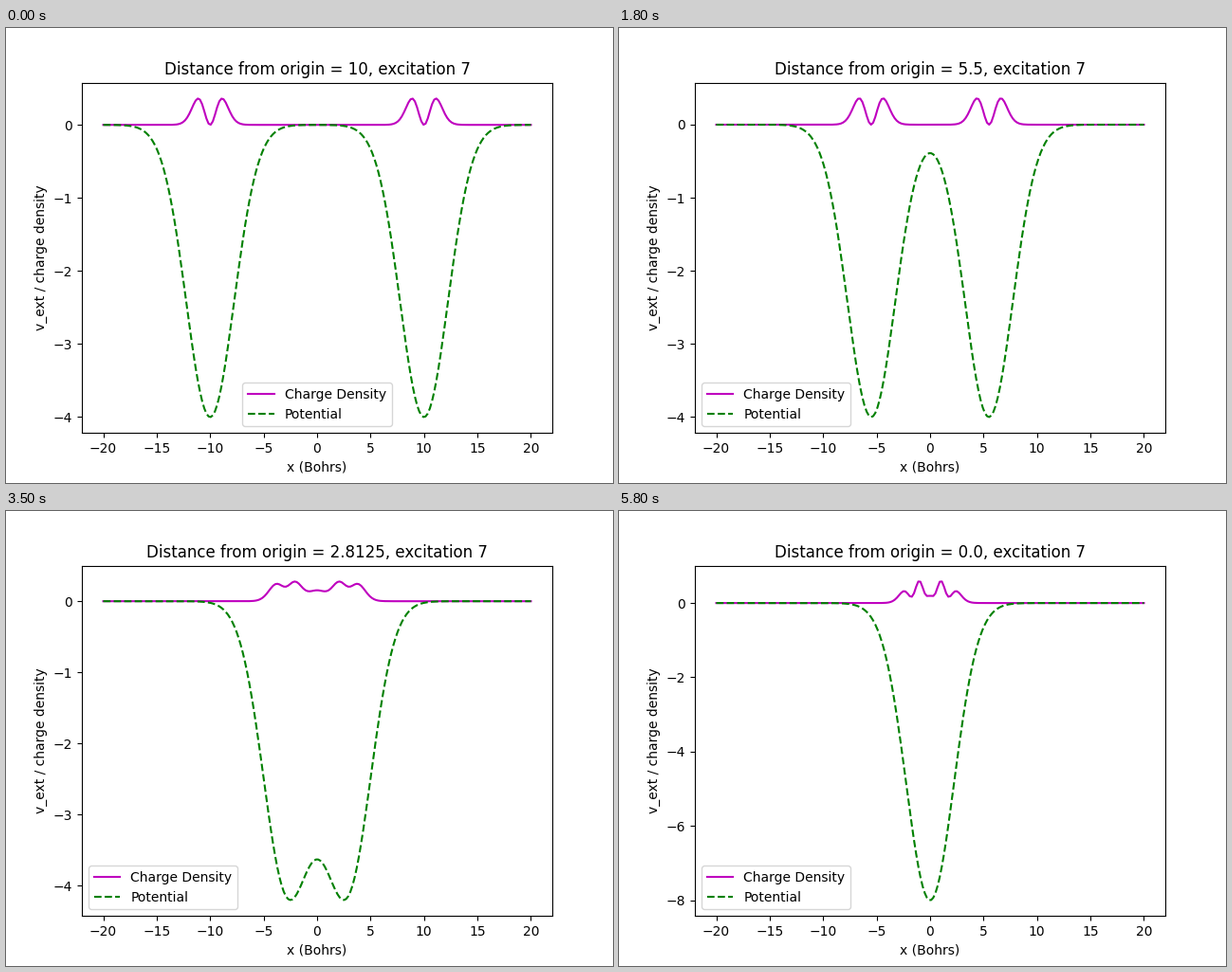
Recreate the animation shown at these times as a matplotlib script. Size 640x480 px, loop 5.9 s.

```python
import numpy as np
import matplotlib.pyplot as plt
from matplotlib.animation import FuncAnimation

# Two like-spin electrons in a pair of Gaussian wells that slide together.
N, M = 200, 22
x = np.linspace(-20, 20, N)
dx = x[1] - x[0]
gap = np.subtract.outer(np.arange(N), np.arange(N))
safe = np.where(gap == 0, 1, gap)
kinetic = np.where(gap == 0, np.pi**2 / 6, (-1.0) ** np.abs(gap) / safe**2) / dx**2
repulsion = 1 / (np.abs(np.subtract.outer(x, x)) + 1)
I, J = np.triu_indices(M, 1)


def distances():
    """Separation of each well from the origin, finer near 3 and 2."""
    out = [10]
    for end, step in [(3.5, 1 / 4), (3.25, 1 / 8), (2.75, 1 / 16),
                      (2.25, 1 / 8), (2.0625, 1 / 16), (1.9375, 1 / 32),
                      (1.75, 1 / 16), (1.5, 1 / 8), (0, 1 / 4)]:
        while out[-1] > end:
            out.append(out[-1] - step)
    return out


def potential(d):
    return -4 * (np.exp(-(x - d) ** 2 / 10) + np.exp(-(x + d) ** 2 / 10))


def pair_states(v):
    """Orbitals and two-electron states in the basis of orbital pairs."""
    e, phi = np.linalg.eigh(kinetic + np.diag(v))
    e, phi = e[:M], phi[:, :M]
    rho = (phi[:, :, None] * phi[:, None, :]).reshape(N, M * M)
    g = (rho.T @ repulsion @ rho).reshape(M, M, M, M)
    i, j = I[:, None], J[:, None]
    h = g[i, I, j, J] - g[i, J, j, I] + np.diag(e[I] + e[J])
    return phi, np.linalg.eigh(h)[1]


def pick(phi, states, d):
    """Index of the state with one p-like electron in each well."""
    if d < 3.5:
        return 7
    left, right = (phi.T @ (u * np.exp(-0.45 * u**2)) for u in (x + d, x - d))
    amp = left[I] * right[J] - left[J] * right[I]
    return int(np.argmax(np.abs(amp @ states[:, :16])))


def solve(d):
    v = potential(d)
    phi, states = pair_states(v)
    k = pick(phi, states, d)
    a = np.zeros((M, M))
    a[I, J] = states[:, k]
    a -= a.T
    density = np.sum((phi @ a) ** 2, axis=1) / dx
    return d, k, v, density


def legend_place(d):
    if d >= 8:
        return "lower center"
    return "center right" if d >= 7.25 else "lower left"


scenes = [solve(d) for d in distances()]
fig, ax = plt.subplots(figsize=(6.4, 4.8), dpi=100)


def draw(n):
    d, k, v, density = scenes[n]
    ax.clear()
    ax.plot(x, density, "m-", label="Charge Density")
    ax.plot(x, v, "g--", label="Potential")
    ax.set_title(f"Distance from origin = {d}, excitation {k}")
    ax.set_xlabel("x (Bohrs)")
    ax.set_ylabel("v_ext / charge density")
    ax.legend(loc=legend_place(d))
    return ax.lines


anim = FuncAnimation(fig, draw, frames=len(scenes), interval=100,
                     repeat=True, repeat_delay=0)
plt.show()
```
